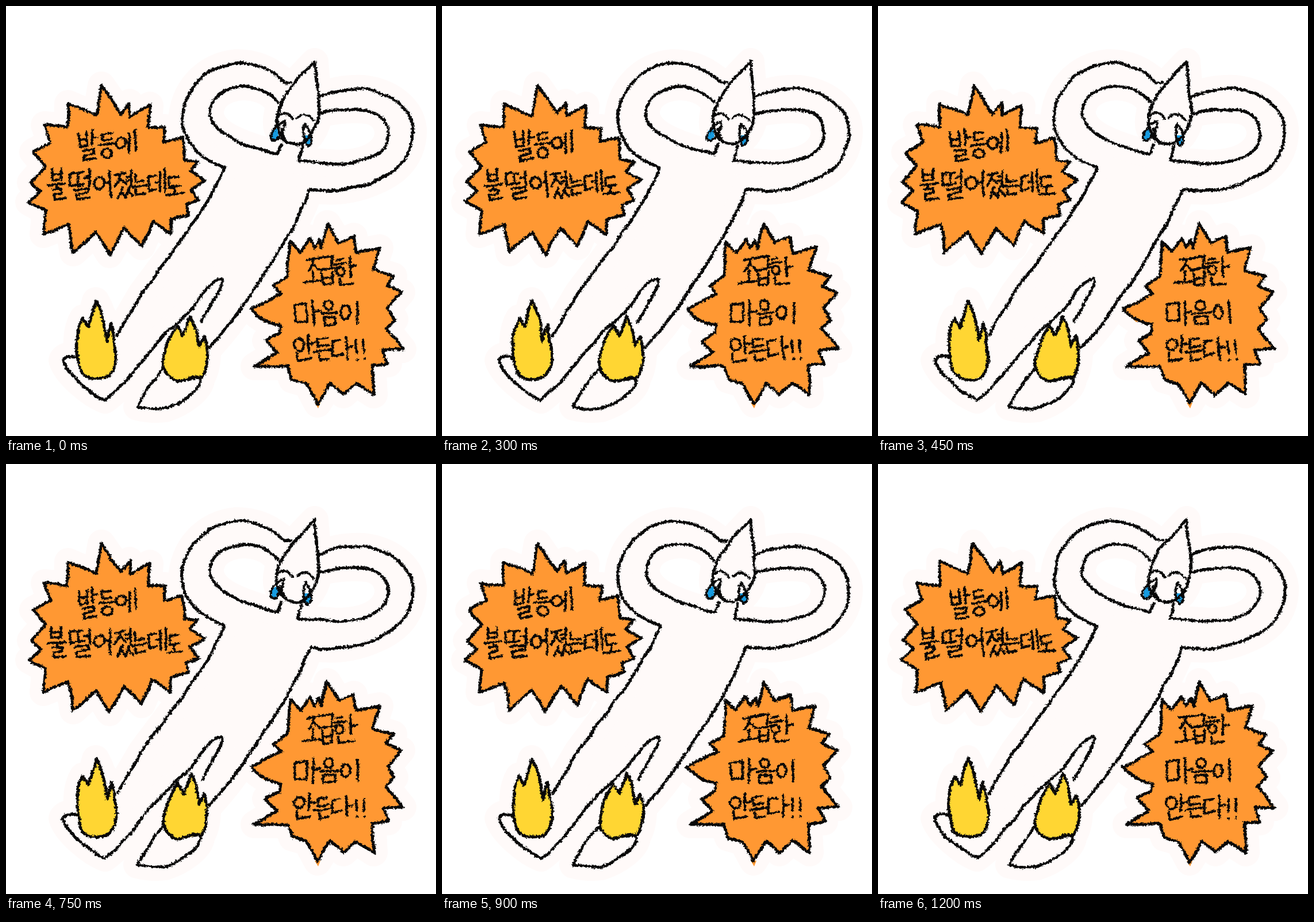
Recreate the animation shown at these times as an HTML page. Size 748 by 748 pixels, loop 1.29 s.

```html
<!DOCTYPE html>
<html lang="ko">
<meta charset="utf-8">
<style>
  html, body { margin: 0; width: 100%; height: 100%; overflow: hidden; background: #fff }
  svg { display: block; width: 100%; height: 100% }
  .halo { fill: #fffaf9; stroke: #fffaf9; stroke-width: 48; stroke-linejoin: round; fill-rule: evenodd }
  .ink { fill: none; stroke: #080808; stroke-width: 5; stroke-linejoin: round; stroke-linecap: round }
  .letters { stroke-width: 4.2 }
</style>
<svg viewBox="0 0 748 748" role="img" aria-label="발등에 불 떨어졌는데도 조급한 마음이 안든다!!">
  <filter id="crayon" filterUnits="userSpaceOnUse" x="0" y="0" width="748" height="748" color-interpolation-filters="sRGB">
    <feTurbulence type="fractalNoise" baseFrequency=".03" result="slow"/>
    <feDisplacementMap in="SourceGraphic" in2="slow" scale="7" xChannelSelector="R" yChannelSelector="G" result="bent"/>
    <feTurbulence type="fractalNoise" baseFrequency=".3" numOctaves="2" result="fine"/>
    <feDisplacementMap in="bent" in2="fine" scale="6" xChannelSelector="R" yChannelSelector="G"/>
  </filter>
  <g id="art"></g>
</svg>
<script>
const ORANGE = '#ff9833', YELLOW = '#ffd633', BLUE = '#169be0';

const burstA = `M166 138L200 187 215 168 217 191 250 173 247 211 277 212 274 237 307 229 311 268 334 271
  321 288 346 303 321 319 335 338 314 346 318 362 287 371 287 397 254 375 236 418 206 386 180 432
  156 393 117 429 109 380 65 397 69 357 40 341 61 322 43 307 68 278 47 254 78 237 67 207 107 211
  108 170 157 191Z`;
const burstB = `M559 379L579 412 605 401 609 429 650 421 638 459 674 470 661 487 688 498 664 526 676 545
  661 561 690 597 655 598 665 622 637 625 640 676 609 656 587 676 564 656 542 692 523 657 498 650
  490 627 432 627 471 603 452 582 475 569 477 555Q447 551 426 527L478 500 465 487 490 471 494 410
  511 428 528 404 536 420 545 407 549 421Z`;
const flameA = `M124 580Q125 558 134 543L143 559 156 513Q168 535 171 552L175 583 183 552Q187 570 188 584
  C195 612 192 634 178 645C164 653 143 650 134 641C124 627 123 600 124 580Z`;
const flameB = `M277 604Q284 574 299 556L308 574 322 539Q332 560 333 575L336 592 345 575Q350 588 350 601
  Q350 628 341 645Q317 649 298 653C278 645 268 628 277 604Z`;
const head = `M537 97C514 120 495 140 484 158C474 175 468 198 472 212C478 230 489 240 506 240
  C528 236 542 212 544 184C543 154 539 126 537 97Z`;
const tearL = 'M484 200C471 207 459 219 460 230Q465 238 472 231C481 222 486 212 484 200Z';
const tearR = 'M521 206C516 219 516 236 524 243Q532 241 531 229C530 220 526 212 521 206Z';

// Pen lifts are the inner M commands
const body = `M495 133L485 133C460 110 432 99 401 99C345 104 307 148 306 201C312 249 344 267 380 281
  C362 328 330 373 281 440L236 500 193 573M123 611Q104 605 98 616C105 640 145 674 172 685
  C202 664 226 630 252 598L280 567 322 529C343 499 358 475 376 474C380 485 360 513 341 549
  M272 632C258 649 240 673 228 697Q252 703 277 700C309 690 337 667 339 651Q334 641 318 648
  M354 594C384 562 402 536 440 480C475 427 512 370 529 318C575 327 617 319 660 296
  C697 275 709 244 708 214C704 176 667 149 622 144Q581 142 545 157`;
const silhouette = body.replace(/(?!^)M/g, 'L');
const holes = `M473 167C457 147 436 140 410 140C374 143 354 163 355 188C359 226 423 245 473 258L480 240
  M545 188Q584 177 628 181C653 185 666 204 665 225C661 258 624 274 574 274Q540 272 508 269L514 243`;
const eyes = 'M472 192Q487 178 499 197M506 195Q520 180 535 199M479 213Q482 228 491 237';

const ring = (x, y, rx, ry = rx) => `M${x - rx} ${y}a${rx} ${ry} 0 1 0 ${2 * rx} 0a${rx} ${ry} 0 1 0 ${-2 * rx} 0`;

// One entry per syllable
const letters = [
  'M126 220L128 245 142 243 141 218M128 233L141 231M151 215V241M151 229L159 228M133 252L153 249 153 257 135 261 136 269 157 265',
  'M183 220L167 222 168 234 184 231M162 242L190 239' + ring(176, 256, 9, 8),
  ring(200, 238, 8, 9) + 'M208 238L214 237M214 222V255M224 216L225 252',
  'M78 284L80 304 96 302 95 283M79 294L95 293M74 313L104 309M89 312V319M82 320L97 318 97 326 83 329 84 338 104 334',
  'M121 290L111 292 112 312 122 310M134 290L125 291 126 311 136 308M136 299L145 298M145 286L146 312M120 319L145 316 145 323 122 328 124 336 147 333',
  ring(163, 308, 9, 10) + 'M172 308L181 307M181 288L183 332',
  'M190 294L207 290M199 293Q197 305 190 313M199 301L208 309M208 297L216 296M209 304L216 303M216 286L217 313M203 316L195 334M201 324L207 331M214 315L208 333M213 322L221 330',
  'M224 293L225 306 240 304M219 315L244 312M225 319L226 328 241 326',
  'M261 295L248 297 249 321 262 317M261 306L268 305M268 290L269 323M277 286L278 322',
  'M300 297L284 299 285 314 302 311M293 313V325M280 328L308 325',
  'M524 442L547 438M536 441Q533 454 526 461M536 450L546 459M534 461V480M517 483L548 478',
  'M548 438L568 435 566 453M546 459L577 455M550 464L552 485 567 483 568 462M551 474L567 472',
  'M575 442L586 440M571 450L592 447' + ring(581, 461, 7) + 'M599 437L600 470M600 455L610 453M579 473L580 484 604 482',
  'M502 519L503 549 524 547 523 516ZM534 513L535 555M535 533L546 531',
  ring(561, 521, 8) + 'M547 536L578 533M552 542L553 555 573 553 572 540Z',
  ring(591, 533, 8, 11) + 'M611 515L612 552',
  ring(511, 589, 9, 10) + 'M527 573V603M527 589L537 588M506 604L507 618 529 613',
  'M558 579L541 581 542 594 560 591M536 602L567 598M544 606L545 616 562 613',
  'M581 582L567 584 568 608 585 604M592 576L594 614M593 595L603 593',
  'M609 583L610 603M611 614v1M622 582L623 603M624 613v1'
];

const path = (d, attrs = '') => `<path d="${d}" ${attrs}/>`;
const fill = (d, color) => path(d, `fill="${color}"`);
const all = list => list.map(d => path(d)).join('');

art.innerHTML = `
  <g class="halo">${all([silhouette + holes, head, burstA, burstB, flameA, flameB])}</g>
  ${fill(burstA, ORANGE)}${fill(burstB, ORANGE)}${fill('M537 690L543 700 547 690M427 527L449 550 460 545', ORANGE)}
  ${fill(flameA, YELLOW)}${fill(flameB, YELLOW)}
  ${fill('M463 217Q459 234 467 234L474 227 472 212Z', BLUE)}${fill('M518 225Q518 241 525 243 533 238 530 225Z', BLUE)}
  <g filter="url(#crayon)">
    <g class="ink">${all([body, holes, head, burstA, burstB, flameA, flameB])}</g>
    <g class="ink letters">${all([eyes, tearL, tearR, ...letters])}</g>
  </g>`;

const noise = document.querySelectorAll('feTurbulence');
let shown = -1;
function draw() {
  const step = Math.floor(performance.now() % 1290 / 150);
  if (step !== shown) {
    shown = step;
    noise.forEach((n, i) => n.setAttribute('seed', 3 + step * 2 + i));
  }
  requestAnimationFrame(draw);
}
draw();
</script>
</html>
```
